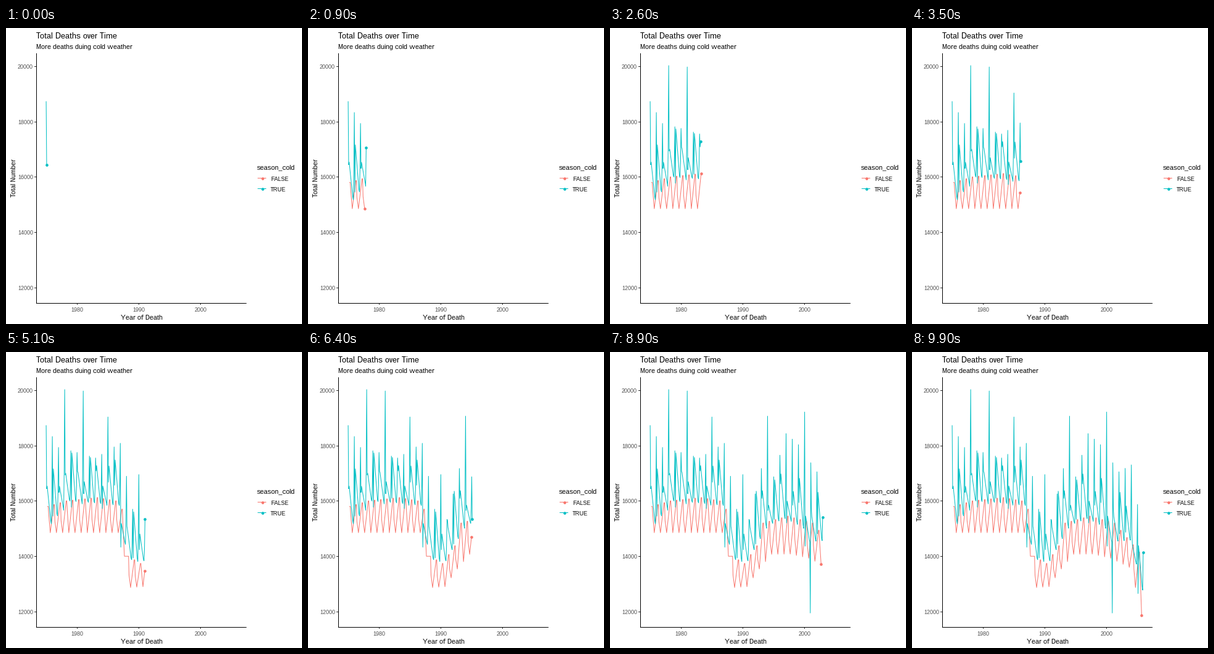
Recreate the animation shown at these times as a matplotlib script. Size 480 px wide and 480 px high, loop 10 s.

```python
import matplotlib.pyplot as plt
import numpy as np
from matplotlib.animation import FuncAnimation

plt.rcParams.update({
    "font.family": "Liberation Sans",
    "text.hinting": "native",
    "text.hinting_factor": 1,
})

SIZE, DPI, FRAMES = 480, 72, 100
START, YEARS = 1975, 31
MONTHS = YEARS * 12
WARM, COLD, GREY = "#F8766D", "#00BFC4", "#4D4D4D"


def trend(keys):
    """Yearly levels drawn straight between a few key years."""
    return np.interp(START + np.arange(YEARS + 1), list(keys), list(keys.values()))


def month_x(month):
    return 65.1 + 10.02 * np.asarray(month) / 12


def count_y(deaths):
    return 421 - (np.asarray(deaths) - 12000) * 0.0449


def cold_season():
    """January peak, February dip, March bump, then a low from October."""
    low = trend({1975: 15270, 1978: 16050, 1986: 15900, 1987: 14500,
                 1988: 13930, 1990: 13880, 1993: 15130, 1996: 15450,
                 1999: 15130, 2000: 14600, 2003: 14660, 2005: 12900})
    peak = trend({1975: 18720, 1977: 17930, 1980: 17750, 1983: 17550,
                  1987: 18080, 1989: 15700, 1991: 15330, 1993: 17170,
                  1995: 16870, 1997: 18430, 1999: 18030, 2002: 17050,
                  2004: 17300, 2005: 15870, 2006: 17000})
    harsh = {1978: 20020, 1981: 19970, 1985: 19030, 1990: 16950,
             1994: 19060, 2000: 19210}
    for year, top in harsh.items():
        peak[year - START] = top

    vals = {}
    for i in range(YEARS):
        rise = peak[i + 1] - low[i]
        jan = 12 * i
        vals[jan] = peak[i]
        vals[jan + 1] = low[i] + 450 + 720 * np.cos(2.4 * i)
        vals[jan + 2] = low[i] + 1150 + 550 * np.sin(1.9 * i + 0.2)
        vals[jan + 9] = low[i]
        vals[jan + 10] = low[i] - 0.03 * rise
        vals[jan + 11] = low[i] + 0.3 * rise
    vals[(2000 - START) * 12 + 11] = 11950
    return vals


def warm_season():
    """Spring high falling unevenly to a low in September."""
    high = trend({1975: 15800, 1978: 16000, 1983: 16120, 1986: 16000,
                  1987: 15700, 1988: 14000, 1990: 13740, 1992: 14380,
                  1993: 15200, 1997: 15450, 2001: 15200, 2005: 14150})
    low = trend({1975: 14850, 1986: 14850, 1987: 14000, 1988: 12870,
                 1990: 12900, 1992: 13540, 1994: 14070, 1997: 14080,
                 2000: 13930, 2003: 13600, 2004: 12870, 2005: 11860})
    vals = {}
    for i in range(YEARS):
        june = low[i] + (high[i] - low[i]) * (0.5 + 0.2 * np.cos(2.1 * i))
        for m in range(3, 9):
            vals[12 * i + m] = np.interp(m, (4, 5, 8), (high[i], june, low[i]))
    return vals


class Trace:
    """A line revealed month by month with a dot at its head."""

    def __init__(self, vals, color, z):
        months = np.array(sorted(vals))
        self.xy = np.column_stack(
            [month_x(months), count_y([vals[m] for m in months])])
        self.steps = np.rint(months * (FRAMES - 1) / (MONTHS - 1))
        self.line, = ax.plot([], [], color=color, lw=1, zorder=z,
                             solid_joinstyle="round")
        self.dot = add_dot(-9, -9, color, z + 2)

    def show(self, k):
        n = np.searchsorted(self.steps, k, side="right")
        pts = self.xy[:n]
        if 0 < n < len(self.xy):
            a, b = self.steps[n - 1:n + 1]
            head = pts[-1] + (self.xy[n] - pts[-1]) * (k - a) / (b - a)
            pts = np.vstack([pts, head])
        self.line.set_data(pts[:, 0], pts[:, 1])
        self.dot.set_data(pts[-1:, 0], pts[-1:, 1])
        return self.line, self.dot


def add_dot(x, y, color, z=3):
    return ax.plot([x], [y], "o", color=color, ms=4.6, mew=0, zorder=z)[0]


def box(x, y, w, h, color):
    ax.add_patch(plt.Rectangle((x, y), w, h, fc=color, lw=0, antialiased=False))


def label(x, y, text, size, color="black", **kw):
    ax.text(x, y, text, fontsize=size, color=color, **kw)


fig = plt.figure(figsize=(SIZE / DPI, SIZE / DPI), dpi=DPI, facecolor="white")
ax = fig.add_axes([0, 0, 1, 1])
ax.set(xlim=(0, SIZE), ylim=(SIZE, 0))
ax.axis("off")

label(49, 17, "Total Deaths over Time", 13)
label(49, 34, "More deaths duing cold weather", 11)
label(220, 473, "Year of Death", 11, ha="center")
label(16, 243.5, "Total Number", 11.4, rotation=90, ha="center", va="baseline",
      rotation_mode="anchor")

box(49, 41, 1, 406, "black")
box(49, 446, 341, 1, "black")
for deaths in range(12000, 20001, 2000):
    y = round(float(count_y(deaths)))
    box(46, y, 3, 1, "#333333")
    label(44, y + 4, str(deaths), 9, GREY, ha="right")
for year in (1980, 1990, 2000):
    x = int(month_x((year - START) * 12))
    box(x, 447, 1, 2, "#333333")
    label(x + 0.5, 460, str(year), 9, GREY, ha="center")

label(407, 229, "season_cold", 11)
for y, name, color in ((243, "FALSE", WARM), (260, "TRUE", COLD)):
    box(408, y, 14, 1, color)
    add_dot(415.5, y + 0.5, color)
    label(429, y + 5, name, 9)

traces = [Trace(warm_season(), WARM, 3), Trace(cold_season(), COLD, 4)]


def update(k):
    return [artist for t in traces for artist in t.show(k)]


anim = FuncAnimation(fig, update, frames=FRAMES, interval=1000 / 10,
                     repeat=True, repeat_delay=0, blit=False)
plt.show()
```
